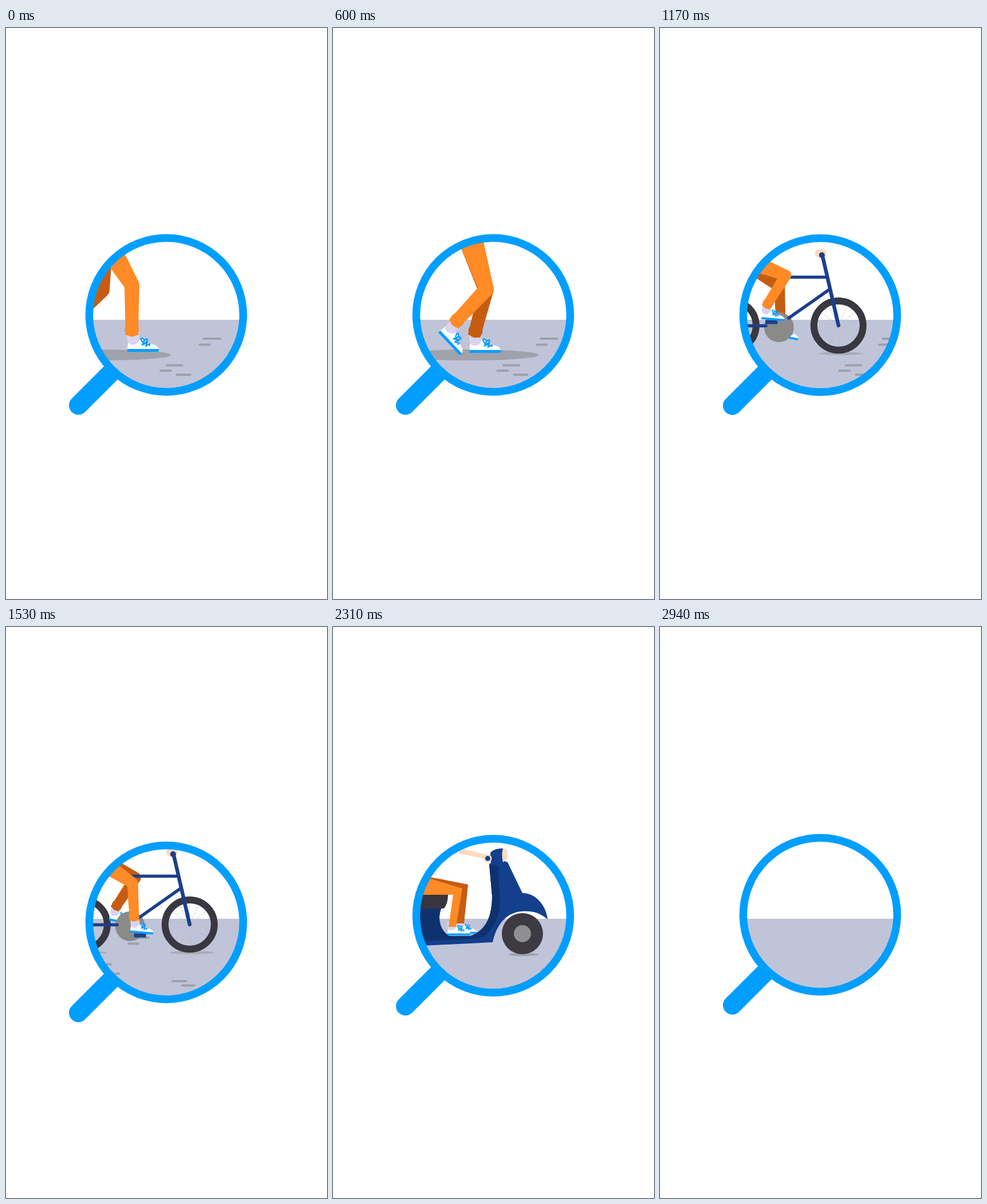
Animation, 561 px wide and 998 px high, one loop 2.97 s. Source, as an HTML page:

```html
<!DOCTYPE html>
<html lang="en">
<head>
<meta charset="utf-8">
<title>Walk, ride, drive</title>
<style>
html, body { margin: 0; width: 100%; height: 100%; overflow: hidden; background: #fff; }
svg { display: block; width: 100%; height: 100%; }
</style>
</head>
<body>
<svg viewBox="0 0 561 998">
  <defs><clipPath id="lens"><circle id="lensClip" cx="280" r="130"/></clipPath></defs>
  <path id="handle" d="M126.5 158.5L188 97" stroke="#009eff" stroke-width="33" stroke-linecap="round"/>
  <g clip-path="url(#lens)">
    <path d="M130 350H430V510H130Z" fill="#fff"/>
    <path d="M130 510H430V670H130Z" fill="#c0c4d8"/>
    <g id="scene"></g>
  </g>
  <circle id="ring" cx="280" r="134.5" fill="none" stroke="#009eff" stroke-width="13.5"/>
</svg>
<script>
const LOOP = 2970, STEP = 30;
const BLUE = '#009eff', ORANGE = '#ff8a26', BROWN = '#c65c12', NAVY = '#1c3f8c',
  BODY = '#133f8c', DARK = '#0f326f', TYRE = '#39373f', SKIN = '#ffdabb', SHADE = '#9fa1ab';
const RIDE = { start: 1050, end: 1730 }, DRIVE = { start: 1730, end: 2900 };
const $ = id => document.getElementById(id);
const n = v => v.toFixed(2);

const path = (d, fill) => `<path d="${d}" fill="${fill}"/>`;
const line = (d, color, width, cap = 'round') =>
  `<path d="${d}" fill="none" stroke="${color}" stroke-width="${width}" stroke-linecap="${cap}" stroke-linejoin="round"/>`;
const disc = (x, y, r, fill) => `<circle cx="${n(x)}" cy="${n(y)}" r="${n(r)}" fill="${fill}"/>`;
const oval = (x, y, rx, ry, fill) => `<ellipse cx="${n(x)}" cy="${y}" rx="${rx}" ry="${ry}" fill="${fill}"/>`;
const shift = (x, content) => `<g transform="translate(${n(x)} 0)">${content}</g>`;

function taper([x1, y1], r1, [x2, y2], r2, fill) {
  const len = Math.hypot(x2 - x1, y2 - y1) || 1;
  const ux = (y1 - y2) / len, uy = (x2 - x1) / len;
  const at = (x, y, r) => n(x + ux * r) + ' ' + n(y + uy * r);
  return path(`M${at(x1, y1, r1)}L${at(x2, y2, r2)}L${at(x2, y2, -r2)}L${at(x1, y1, -r1)}Z`, fill);
}

// A shoe with its ankle at the local origin.
function shoe([x, y], angle, scale) {
  return `<g transform="translate(${n(x)} ${n(y)}) rotate(${n(angle)}) scale(${scale})">` +
    path('M-8-4L11-4Q16 10 10 17L-5 17Q-10 9-8-4Z', '#d9d3ee') +
    path('M-7 13C-2 18 8 19 13 8L19 6C25 18 46 13 47 25H-8Z', '#fff') +
    path('M-8 24H47Q48 29 44 29H-8Z', BLUE) +
    line('M20 14Q13 5 18 5Q23 7 20 14Q22 5 27 7Q28 12 20 14L18 17L27 13L24 19L31 15V18', BLUE, 2.3) + '</g>';
}

function leg(hip, knee, ankle, tilt, color, scale, hipR) {
  const s = scale, len = Math.hypot(ankle[0] - knee[0], ankle[1] - knee[1]);
  const cuff = knee.map((v, i) => ankle[i] + (v - ankle[i]) * 10 * s / len);
  return shoe(ankle, tilt, s) + taper(hip, hipR, knee, 13 * s, color) + disc(...knee, 13 * s, color) +
    taper(knee, 13 * s, ankle, 11 * s, color) + disc(...cuff, 12.4 * s, color);
}

// Gait keys: phase, knee x/y, ankle x/y (from the hip), foot tilt.
const gait = (back, front) => [
  [0, 54, 89, 54, 177, 0], [.2, 25, 101, 0, 179, 0], [.4, ...back],
  [.5, 2, 98, -60, 160, 50], [.65, 28, 98, -32, 158, 48], [.9, ...front], [1, 54, 89, 54, 177, 0]];
const NEAR = gait([-7, 103, -59, 171, 35], [67, 78, 42, 160, 28]);
const FAR = gait([7, 98, -37, 166, 32], [51, 77, 28, 163, 26]);

function stride(keys, phase, hip, color) {
  phase %= 1;
  const i = keys.findIndex(k => k[0] > phase), a = keys[i - 1], b = keys[i];
  const u = (phase - a[0]) / (b[0] - a[0]);
  const [, kx, ky, ax, ay, tilt] = a.map((v, j) => v + (b[j] - v) * u);
  return leg(hip, [hip[0] + kx, hip[1] + ky], [hip[0] + ax, hip[1] + ay], tilt, color, 1, 22);
}

function walker(t) {
  const late = Math.max(0, t - 840);
  const hip = [166 + .3424 * t - .000372 * t * t - .006 * late * late, 360];
  const phase = t / 900;
  return oval(hip[0], 571.5, 122, 9.5, SHADE) +
    stride(FAR, phase + .5, hip, BROWN) + stride(NEAR, phase, hip, ORANGE);
}

function bentKnee([hx, hy], [ax, ay], thigh, shin) {
  const dx = ax - hx, dy = ay - hy, d = Math.hypot(dx, dy);
  const along = (thigh * thigh - shin * shin + d * d) / (2 * d);
  const out = Math.sqrt(Math.max(0, thigh * thigh - along * along));
  return [hx + (dx * along + dy * out) / d, hy + (dy * along - dx * out) / d];
}

function wheel(x) {
  let spokes = '';
  for (let i = 0; i < 14; i++) {
    const a = i * Math.PI / 7 + .2;
    spokes += `M${x} 520L${n(x + 38 * Math.cos(a))} ${n(520 + 38 * Math.sin(a))}`;
  }
  return oval(x + 4, 569, 39, 2.8, '#a9abb8') + line(spokes, '#b4b7c6', .6) +
    `<circle cx="${x}" cy="520" r="43" fill="none" stroke="${TYRE}" stroke-width="12"/>`;
}

function cyclist(t) {
  const hip = [155, 404], turn = .53 + (t - 1530) / 800 * 2 * Math.PI;
  const pedal = side => [217 + side * 20 * Math.cos(turn), 529 + side * 20 * Math.sin(turn)];
  const limb = (side, color, tilt) => {
    const [px, py] = pedal(side), ankle = [px - 10, py - 26];
    return leg(hip, bentKnee(hip, ankle, 79, 66), ankle, tilt, color, .74, 16);
  };
  const [px, py] = pedal(1);
  return wheel(134) + wheel(321) +
    limb(-1, BROWN, 12) +
    disc(217, 523, 26, '#8a8a89') +
    line('M134 520.5H194', NAVY, 5.5) +
    line('M218 435.5H301M305 457L234 507', NAVY, 5.5) +
    oval(290, 394, 10, 8, SKIN) + line('M293 398L321 520', NAVY, 6.5) + disc(292, 397, 5, NAVY) +
    `<rect x="${n(px - 10.5)}" y="${n(py - 3.5)}" width="21" height="7" fill="${NAVY}"/>` +
    limb(1, ORANGE, 5);
}

function scooter() {
  return oval(333, 572.5, 27, 2.8, SHADE) +
    path('M100 490H190C183 505 184 528 203 540H240C268 530 278 505 278 470L273 414Q290 404 305 411L331 465C355 465 373 488 375 511C362 500 350 496 331 497C306 498 286 517 279 551L157 557H100Z', BODY) +
    path('M100 490H190C183 505 184 528 203 540H240C268 530 278 505 278 470L273 416L289 417Q289 448 292 480C291 510 276 538 256 544L157 549H100Z', DARK) +
    disc(331, 536, 36, '#3d3a43') + disc(331, 536, 15, '#8f8f91') +
    shoe([221, 516], 2, .66) +
    path('M165 437L180 439L236 450L229 518H214L220 466L160 462Z', BROWN) +
    path('M120 468H201Q201 483 194 492H120Z', '#39353f') +
    shoe([206, 518], 0, .73) +
    path('M120 440H170L226 457L215 524H202L210 468H120Z', ORANGE) +
    path('M276 393Q285 386 298 387Q306 399 298 411L278 416Q272 405 276 393Z', BODY) +
    path('M297 387Q305 386 305 398Q304 409 297 411Q294 398 297 387Z', SKIN) +
    path('M220 386L268 398L268 405L220 396Z', SKIN) +
    disc(270.5, 404.5, 7, SKIN) + disc(270.5, 404.5, 4.4, BODY);
}

// Pavement marks: left x, y, length.
const MARKS = [[344, 543, 32], [337, 553.5, 21], [279, 589.5, 31], [268, 599, 22],
  [297, 606, 27], [414, 619, 28], [431, 626.5, 25]];

function ground(t) {
  const driving = t >= DRIVE.start, span = driving ? 416 : 297;
  const offset = driving ? 139 + .5 * (t - 1950) : t < RIDE.start ? .466 * t : 125 + .468 * (t - 1530);
  const moved = (offset % span + span) % span;
  // The middle marks sit higher on the second stretch of the walk.
  const raised = t > 640 && t < RIDE.start;
  const d = MARKS.map(([x, y, w], i) => {
    const row = raised && i > 1 && i < 5 ? y - 11 : y;
    return [0, span].map(k => `M${n(x - moved + k + 2)} ${row}h${w - 4}`).join('');
  }).join('');
  return line(d, SHADE, 4);
}

function slide(t, { start, end }) {
  const before = Math.max(0, 1 - (t - start) / 180), after = Math.max(0, 1 - (end - t) / 180);
  return -245 * (before ** 3 + after ** 2);
}

function draw(t) {
  const cy = 501.5 + 7.5 * (1 - Math.cos(t / 600 * 2 * Math.PI));
  $('lensClip').setAttribute('cy', cy);
  $('ring').setAttribute('cy', cy);
  $('handle').setAttribute('transform', `translate(0 ${cy - .5})`);
  const actor = t < RIDE.start ? walker(t)
    : t < RIDE.end ? shift(slide(t, RIDE), cyclist(t))
    : t < DRIVE.end ? shift(slide(t, DRIVE), scooter()) : '';
  $('scene').innerHTML = ground(t) + actor;
}

function tick() {
  const t = performance.now() % LOOP;
  draw(Math.floor(t / STEP) * STEP);
  requestAnimationFrame(tick);
}
tick();
</script>
</body>
</html>
```
